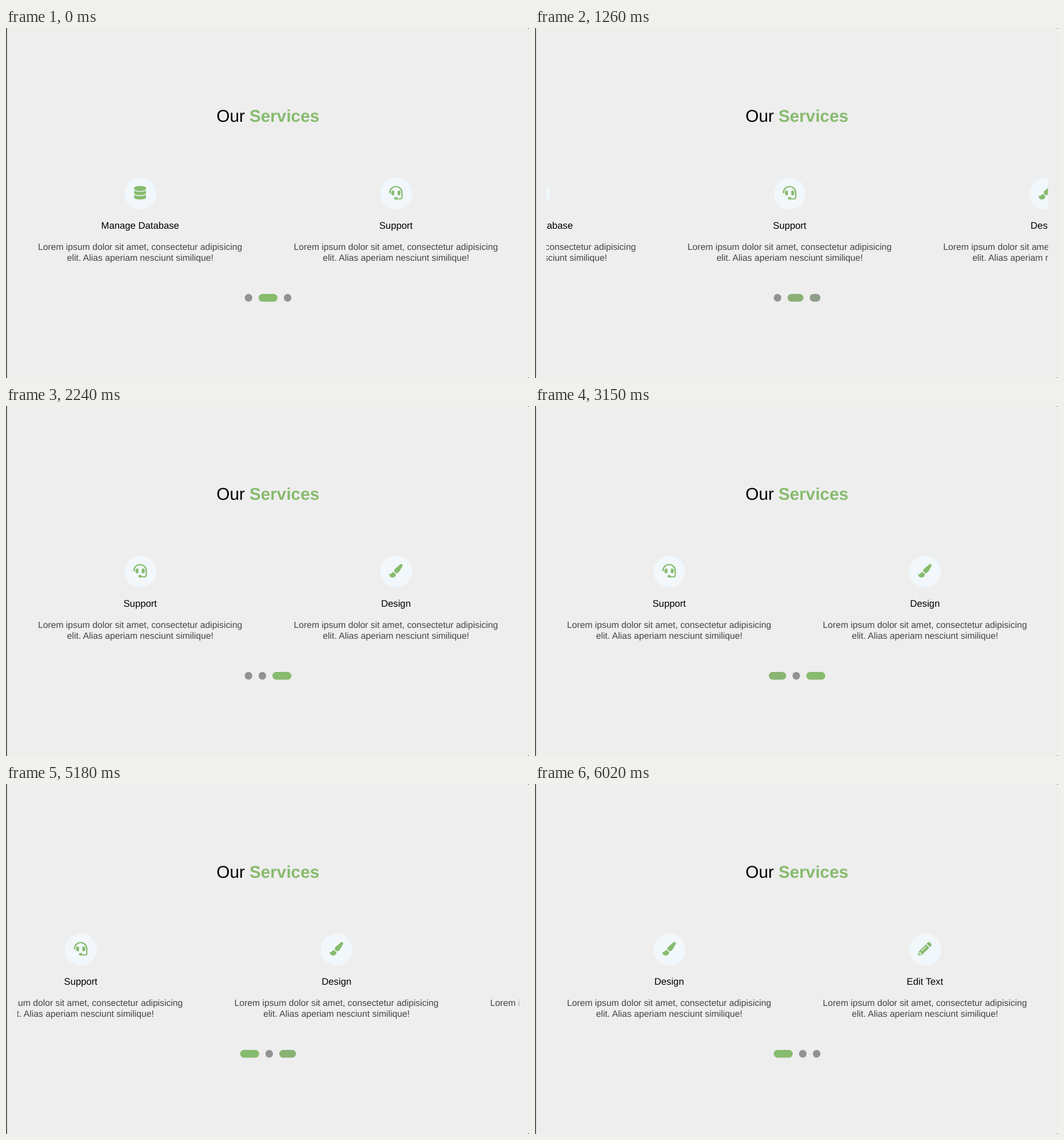
Animation, 915 px wide and 612 px high, one loop 6.3 s. Source, as an HTML page with a canvas:

```html
<!DOCTYPE html>
<html lang="en">
<head>
<meta charset="utf-8">
<title>Our Services</title>
<style>
  html, body { margin: 0; width: 100%; height: 100%; overflow: hidden; background: #eee; }
  canvas { display: block; }
</style>
</head>
<body>
<canvas id="stage" width="915" height="612"></canvas>
<script>
const ctx = document.getElementById('stage').getContext('2d');
const LOOP = 6300, STEP = 70;
const GREEN = [135, 187, 109], GRAY = [146, 146, 148];
const FONT = '"Liberation Sans", Arial, sans-serif';
const rgb = c => `rgb(${c.join(',')})`;
const clamp = v => Math.min(1, Math.max(0, v));

// Icons live in a 512-unit box.
const cylinder = y => `M448 ${y}v103c0 40-100 73-224 73S0 ${y + 143} 0 ${y + 103}V${y}c48 33 136 48.6 224 48.6S400 ${y + 33} 448 ${y}z`;
const databasePath = new Path2D(
  'M448 73v46c0 40-100 73-224 73S0 159 0 119V73C0 33 100 0 224 0s224 33 224 73z' + cylinder(176) + cylinder(336));
const earsPath = new Path2D(
  'M192 208c0-18-14-32-32-32h-16c-35 0-64 29-64 64v48c0 35 29 64 64 64h16c18 0 32-14 32-32z' +
  'M368 352c35 0 64-29 64-64v-48c0-35-29-64-64-64h-16c-18 0-32 14-32 32v112c0 18 14 32 32 32z' +
  'M240 416h32a48 48 0 0 1 0 96h-32a48 48 0 0 1 0-96z');
const bandPath = new Path2D('M24 264V256A232 232 0 0 1 488 256V422a66 66 0 0 1-66 66H272');
const brushPath = new Path2D(
  'M167 309c-40 3-76 18-97 73-2 6-8 10-15 10-11 0-45-28-55-35C0 440 38 512 128 512c76 0 128-44 128-120l-1-9z' +
  'M458 0c-15 0-29 7-40 16C213 199 192 203 192 257c0 14 3 27 9 39l64 53c7 2 15 3 22 3 62 0 98-45 211-256 7-15 14-30 14-46C512 21 486 0 458 0z');
const pencilPath = new Path2D(
  'M498 142l-46 46c-5 5-12 5-17 0L324 77c-5-5-5-12 0-17l46-46c19-19 49-19 68 0l60 60c19 19 19 49 0 68z' +
  'M284 100L22 362 .4 484c-3 16 11 31 28 28l121-22 263-262c5-5 5-12 0-17L301 100c-5-5-12-5-17 0z' +
  'M124 340c-5-5-5-14 0-20l154-154c6-5 14-5 20 0s5 14 0 20L144 340c-6 5-14 5-20 0z' +
  'M88 424h48v36l-64 12-32-31 12-65h36z');

const items = [
  { label: 'Manage Database', width: 448, draw: () => ctx.fill(databasePath) },
  { label: 'Support', width: 512, draw: drawHeadset },
  { label: 'Design', width: 512, draw: () => ctx.fill(brushPath) },
  { label: 'Edit Text', width: 512, draw: () => ctx.fill(pencilPath, 'evenodd') }
];
const PITCH = 447.5, FIRST_X = 235;
const SLIDES = [1183, 5137], SLIDE_MS = 250;

// Per dot: [time, level] points; 0 is a gray circle, 1 a wide green pill.
const dotKeys = [
  [[2460, 0], [2760, 1], [3108, 1], [3408, 0], [3540, 0], [3620, .27], [3700, 0], [4483, 0], [4783, 1]],
  [[1178, 1], [1478, 0], [2080, 0], [2150, .23], [2220, 0], [2350, 0], [2450, .33], [2550, 0],
   [3640, 0], [3940, 1], [4383, 1], [4683, 0]],
  [[1178, 0], [1478, 1], [5120, 1], [5420, 0]]
];
dotKeys[1].unshift([0, 1]);

function levelAt(keys, t) {
  const next = keys.findIndex(k => k[0] > t);
  if (next === 0) return keys[0][1];
  if (next < 0) return keys[keys.length - 1][1];
  const [t0, a] = keys[next - 1], [t1, b] = keys[next];
  return a + (b - a) * (t - t0) / (t1 - t0);
}

// CSS "ease": cubic-bezier(.25, .1, .25, 1)
function ease(x) {
  let lo = 0, hi = 1;
  for (let i = 0; i < 24; i++) {
    const s = (lo + hi) / 2;
    if (.75 * s - .75 * s * s + s ** 3 < x) lo = s; else hi = s;
  }
  const u = 1 - lo;
  return 1 - 2.7 * u * u + 1.7 * u ** 3;
}

function text(str, x, y, size, color, align = 'center', weight = '') {
  ctx.font = `${weight} ${size}px ${FONT}`;
  ctx.textRendering = 'geometricPrecision';
  ctx.textAlign = align;
  ctx.fillStyle = color;
  ctx.fillText(str, x, y);
}

function drawHeadset() {
  ctx.fill(earsPath);
  ctx.lineWidth = 48;
  ctx.lineCap = 'round';
  ctx.strokeStyle = rgb(GREEN);
  ctx.stroke(bandPath);
}

function drawItem({ label, width, draw }, x) {
  ctx.fillStyle = '#f1f7fb';
  ctx.beginPath();
  ctx.arc(x, 289.5, 27.8, 0, Math.PI * 2);
  ctx.fill();

  ctx.save();
  ctx.translate(x - .4, 288);
  ctx.scale(.0463, .0463);
  ctx.translate(-width / 2, -256);
  ctx.fillStyle = rgb(GREEN);
  draw();
  ctx.restore();

  text(label, x - .3, 351.3, 16.7, '#000');
  text('Lorem ipsum dolor sit amet, consectetur adipisicing', x - .4, 388.4, 15.73, '#444');
  text('elit. Alias aperiam nesciunt similique!', x - .2, 406.7, 15.73, '#444');
}

function drawSlides(t) {
  const scroll = SLIDES.reduce((sum, start) => sum + ease(clamp((t - start) / SLIDE_MS)), 0);
  ctx.save();
  ctx.beginPath();
  ctx.rect(20, 240, 877.5, 200);
  ctx.clip();
  items.forEach((item, i) => drawItem(item, FIRST_X + (i - scroll) * PITCH));
  ctx.restore();
}

function drawDots(t) {
  const size = 13.3, grow = 20, gap = 10.9;
  const levels = dotKeys.map(keys => levelAt(keys, t));
  const total = levels.reduce((sum, v) => sum + size + grow * v, 2 * gap);
  let x = 458.5 - total / 2;
  for (const v of levels) {
    const w = size + grow * v;
    ctx.fillStyle = rgb(GRAY.map((g, i) => Math.round(g + (GREEN[i] - g) * v)));
    ctx.beginPath();
    ctx.roundRect(x, 465.1, w, size, size / 2);
    ctx.fill();
    x += w + gap;
  }
}

function drawFrame() {
  ctx.fillStyle = '#eee';
  ctx.fillRect(0, 0, 915, 612);
  ctx.fillStyle = '#3a3a3c';
  ctx.fillRect(0, 0, 1.6, 612);
  for (const y of [0, 612]) {
    ctx.beginPath();
    ctx.moveTo(913, y);
    ctx.lineTo(915, y);
    ctx.lineTo(915, Math.abs(y - 1.5));
    ctx.fill();
  }
  text('Our', 368.3, 163.6, 29.8, '#000', 'left');
  text('Services', 426, 163.6, 29.7, rgb(GREEN), 'left', 'bold');
}

function render(now) {
  const t = Math.floor((now % LOOP) / STEP) * STEP;
  drawFrame();
  drawSlides(t);
  drawDots(t);
}

const begin = performance.now();
function tick() {
  render(performance.now() - begin);
  requestAnimationFrame(tick);
}
tick();
</script>
</body>
</html>
```
